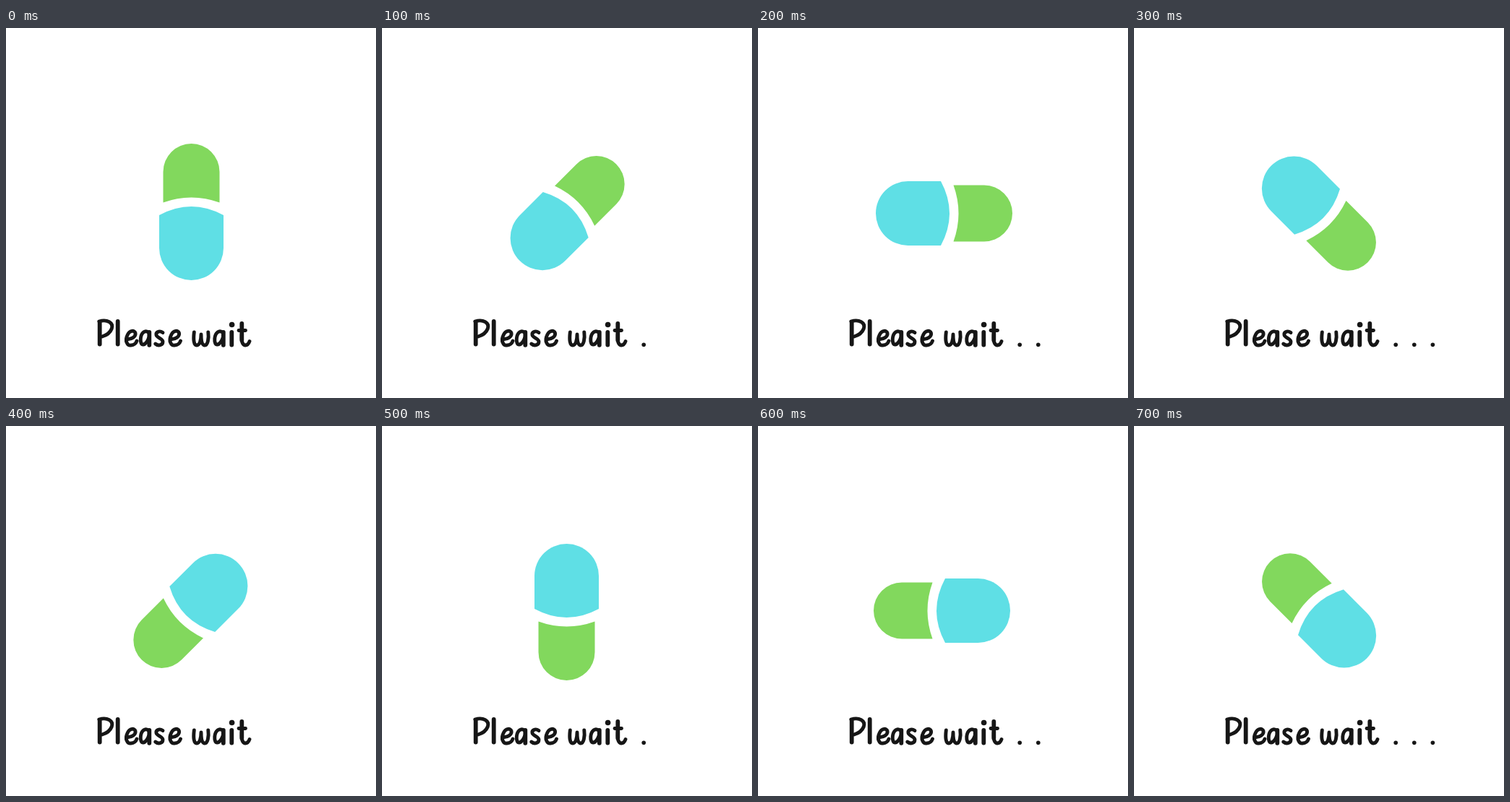
Write an HTML page with a canvas that moves like this. It is 512 by 512 pixels and loops after 0.8 s.

```html
<!DOCTYPE html>
<html lang="en">
<head>
<meta charset="utf-8">
<title>Please wait</title>
<style>
html, body { margin: 0; width: 100%; height: 100%; overflow: hidden; background: #fff; }
canvas { display: block; width: 100vw; height: 100vh; object-fit: contain; }
</style>
</head>
<body>
<canvas id="stage" width="512" height="512" role="img" aria-label="Please wait">Please wait . . .</canvas>
<script>
const ctx = document.getElementById('stage').getContext('2d');
const STEP = 100;
const ANGLES = [0, 45, 90, 135, 225, 180, 270, 315];
const INK = '#161616';

const greenHalf = new Path2D('M217.5 241.5V199A39 39 0 0 1 295.5 199V241.5Q256.5 227.5 217.5 241.5Z');
const blueHalf = new Path2D('M212 259Q256.5 235 301 259V304.5A44.5 44.5 0 0 1 212 304.5Z');

// Handwritten letters: round strokes, upright stems, x offset
const E = 'M168 430.5C174 431 180 427 179 422C178 418 171 418 168 425C164 433 168 440 173 439C177 439 180 436 181 433';
const A = 'M198 422C193 417 187 421 186.3 430C185.5 441 193 441 198 428';
const A_STEM = 'M198.3 420.8V438.8';
const letters = [
  ['M128.8 406C140 402.5 149 408 146.3 416C144 422 138 425.5 133 427', 'M129.7 407V437.5', 0],
  ['', 'M154.7 406V437.5', 0],
  [E, '', 0],
  [A, A_STEM, 0],
  ['M217 421.5C212 418 207 421 208 425C209 429 217 429.5 217 434C217 439 211 440.5 206.7 437', '', 0],
  [E, '', 60.5],
  ['M260.3 421C259 432 260 439 264 439C268 439 270 432 270 424C270 433 271 439 275 439C279 439 281 430 279.8 421', '', 0],
  [A, A_STEM, 102.5],
  ['', 'M312.3 420.8V438.5', 0],
  ['M326.3 424C326 432 326 438 331 439C334 439 336 436.5 337 433.5M322 418.5H331.5', 'M326.3 409V432', 0]
].map(([round, stem, dx]) => [new Path2D(round), new Path2D(stem), dx]);

function dot(x, y, r) {
  ctx.beginPath();
  ctx.arc(x, y, r, 0, Math.PI * 2);
  ctx.fill();
}

function strokePath(path, width) {
  ctx.lineWidth = width;
  ctx.stroke(path);
}

function drawPill(degrees) {
  ctx.save();
  ctx.translate(256, 256);
  ctx.rotate(degrees * Math.PI / 180);
  ctx.translate(-256, -256);
  ctx.fillStyle = '#82d85d';
  ctx.fill(greenHalf);
  ctx.fillStyle = '#5fdfe5';
  ctx.fill(blueHalf);
  ctx.restore();
}

function drawText(dots) {
  ctx.strokeStyle = ctx.fillStyle = INK;
  ctx.lineCap = ctx.lineJoin = 'round';
  for (const [round, stem, dx] of letters) {
    ctx.save();
    ctx.translate(dx, 0);
    strokePath(round, 4.9);
    strokePath(stem, 5.8);
    ctx.restore();
  }
  dot(312.6, 410.5, 3.8);
  for (let i = 0; i < dots; i++) dot(362.2 + i * 25.6, 438.3, 2.8);
}

function draw() {
  const step = Math.floor(performance.now() / STEP) % ANGLES.length;
  ctx.fillStyle = '#fff';
  ctx.fillRect(0, 0, 512, 512);
  drawPill(ANGLES[step]);
  drawText(step % 4);
  requestAnimationFrame(draw);
}
draw();
</script>
</body>
</html>
```
